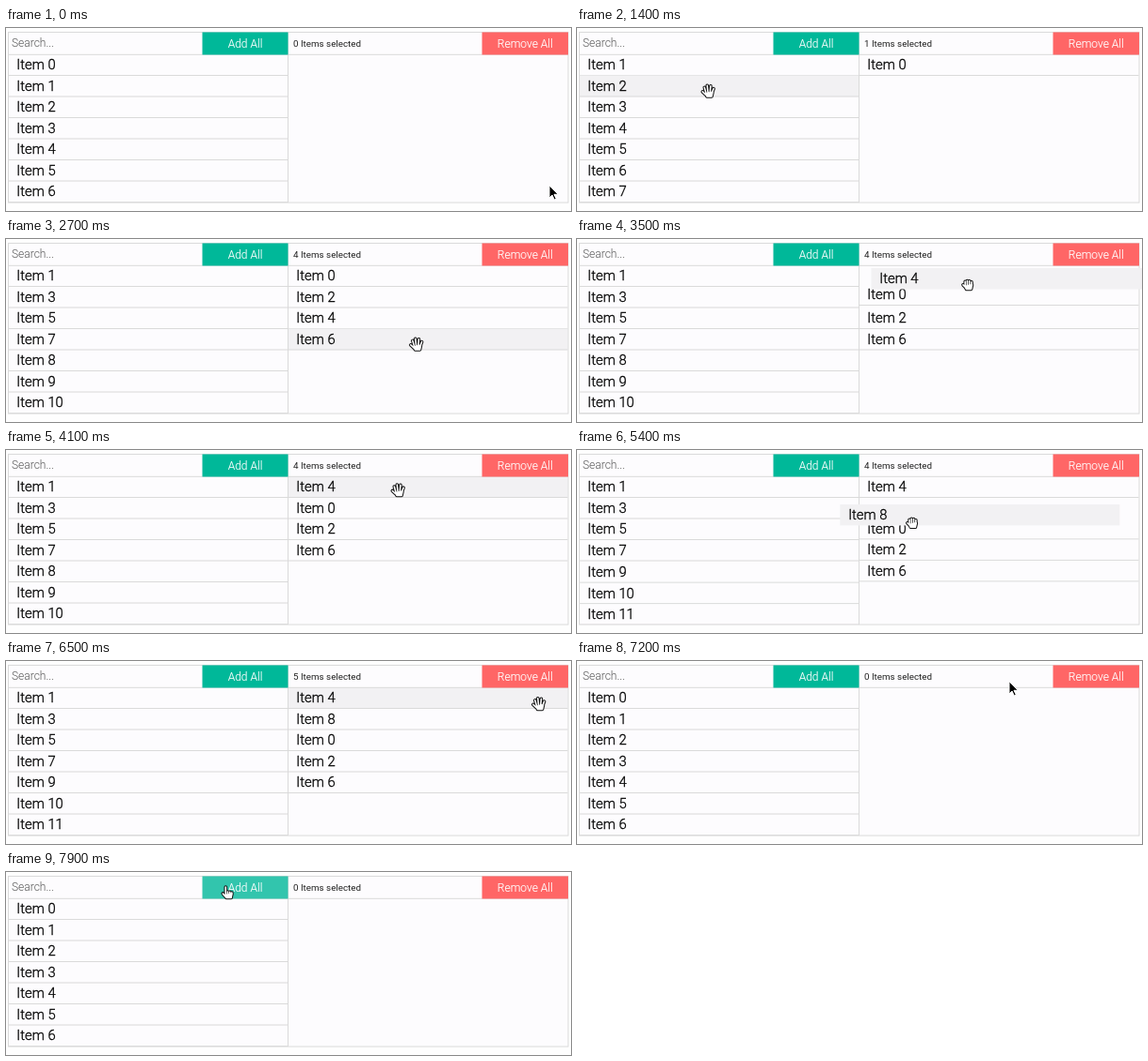
Write an HTML page that moves like this. It is 600 px wide and 195 px high and loops after 8000 ms.

```html
<!DOCTYPE html>
<html lang="en">
<head>
<meta charset="utf-8">
<title>Dual list picker</title>
<style>
html, body { margin: 0; width: 100%; height: 100%; overflow: hidden; background: #fefefe; }
svg { display: block; font: 300 12px Roboto, sans-serif; }
.row { font-size: 14.8px; stroke: #000; stroke-width: .3px; }
.count { font-size: 9.8px; font-weight: 400; fill: #222; }
.button { fill: #fff; stroke: #fff; stroke-width: .15px; text-anchor: middle; }
.cursor { stroke-linejoin: round; stroke-linecap: round; }
</style>
</head>
<body>
<svg id="stage" width="600" height="195" viewBox="0 0 600 195"></svg>
<script>
const LOOP = 8000, TOP = 28, ROW = 22.5, WIDTH = 297, LEFT = 2.5, RIGHT = 299.5;
const GREY = '#dadada', HOVER = '#f2f1f3';
const FIRST_CLICK = 1200, CLICK_GAP = 400, CLICKS = 4, CLEAR = 6800;
const stage = document.getElementById('stage');

// Dragged rows: push gives how many rows another item makes way, lag when it starts
const drags = [
  { item: 4, from: 3100, drop: 3800, x: RIGHT, slot: 2, to: 0,
    push: (n, right) => right && n < 4 ? 1 : 0, lag: n => 200 - 50 * n },
  { item: 8, from: 4900, drop: 5900, x: LEFT, slot: 4, to: 1,
    push: (n, right) => right ? +(n !== 4) : -(n > 8), lag: () => 250 }
];

// Pointer moves; it rests between them
const rowY = i => TOP + ROW * (i + .75);
const moves = [];
const go = (from, to, x, y) => moves.push({ from, to, x, y });
go(100, 650, 285, 24);
go(650, 1100, 140, rowY(0));
for (let i = 1; i < CLICKS; i++) {
  const click = FIRST_CLICK + CLICK_GAP * (i - 1);
  go(click, click + 100, 140 - i / 2, rowY(i));
}
go(2400, 2700, 436, rowY(3));
go(2700, 2900, 402, rowY(2));
go(3100, 3600, 416.5, 43);
go(4100, 4700, 79, rowY(4) + 2);
go(4900, 5500, 378, 72);
go(5900, 6500, 566, rowY(0) + 1);
go(6500, 6700, 555, 22);
go(6800, 7900, 235.5, 22);

const ARROW = 'M0 0V13L3 10L5.3 15L7.3 14L5 9.3H9Z';
const PALM = 'M-3 2.5L-1.5 5.5H3.5L4.5 1Z';
const hands = {
  open: 'M-2.5 2L-4.2-4M-.5 1L-1.2-6M1.8 1L2.4-5.6M4 1.5L5.6-2.8M-3 3.5L-6.2.5' + PALM,
  fist: 'M-2.8 1V-2.5M-.6 1V-3.4M1.7 1V-3.2M4 1V-2M-3 3L-5 1' + PALM,
  point: 'M-2.2 2V-6M0 1.5V-1M2.2 1.5V-.6M4.3 2V0M-2.8 4L-5.2 1' + PALM
};

const clamp = v => Math.max(0, Math.min(1, v));
const easeOut = v => 1 - (1 - clamp(v)) ** 2;
const smooth = v => (v = clamp(v), v * v * (3 - 2 * v));
const mix = (a, b, p) => a + (b - a) * p;

const pointerAt = t => moves.reduce(([x, y], m) => {
  const p = smooth((t - m.from) / (m.to - m.from));
  return [mix(x, m.x, p), mix(y, m.y, p)];
}, [577, 168]);

function chosenAt(t) {
  if (t >= CLEAR) return [];
  const clicks = Math.max(0, Math.floor((t - FIRST_CLICK) / CLICK_GAP) + 1);
  let list = Array.from({ length: Math.min(CLICKS, clicks) }, (_, i) => 2 * i);
  for (const d of drags) if (t >= d.drop) {
    list = list.filter(n => n !== d.item);
    list.splice(d.to, 0, d.item);
  }
  return list;
}

const rect = (x, y, w, h, fill, extra = '') =>
  `<rect x="${x}" y="${y}" width="${w}" height="${h}" fill="${fill}" ${extra}/>`;
const text = (x, y, s, extra) => `<text x="${x}" y="${y}" ${extra}>${s}</text>`;
const label = (x, y, n) => text(x + 8.8, y + 16.4, 'Item ' + n, 'class="row"');
const line = (x, y, w) => rect(x, y - .5, w, 1, GREY);
const button = (x, w, s, fill, hover) =>
  rect(x, 4.5, w, 24, fill, hover ? 'opacity=".8"' : '') +
  text(x + w / 2, 20.8, s, 'class="button"');

function drawCursor(kind, x, y) {
  const stroke = (color, width) => `fill="${color}" stroke="${color}" stroke-width="${width}"`;
  const shape = kind === 'arrow'
    ? `<path d="${ARROW}" stroke="#fff"/>`
    : `<path d="${hands[kind]}" ${stroke('#111', 3.6)}/><path d="${hands[kind]}" ${stroke('#fff', 1.6)}/>`;
  return `<g class="cursor" transform="translate(${x} ${y})">${shape}</g>`;
}

function drawDragged(d, t) {
  const [gx, gy] = pointerAt(d.from);
  const [hx, hy] = pointerAt(Math.min(t, d.drop));
  const p = easeOut((t - d.drop) / 200);
  const x = mix(d.x + hx - gx, RIGHT, p);
  const y = mix(TOP + ROW * d.slot + hy - gy, TOP + ROW * d.to, p);
  return rect(x, y, WIDTH, ROW, HOVER) + label(x, y, d.item);
}

function draw(t) {
  const [px, py] = pointerAt(t);
  const chosen = chosenAt(t);
  const rest = [...Array(14).keys()].filter(n => !chosen.includes(n));
  const drag = drags.find(d => t >= d.from && t < d.drop + 200);
  const held = drag && t < drag.drop;
  const over = (x, y, w, h) => !held && px >= x && px < x + w && py >= y && py < y + h;
  let cursor = held ? 'fist' : 'arrow';

  const list = (items, x) => items.map((n, i) => {
    if (drag && drag.item === n) return '';
    const shift = held ? drag.push(n, x === RIGHT) * easeOut((t - drag.from - drag.lag(n)) / 300) : 0;
    const y = TOP + ROW * (i + shift);
    const hover = over(x, y, WIDTH, ROW);
    if (hover) cursor = 'open';
    return (hover ? rect(x, y, WIDTH, ROW, HOVER) : '') + label(x, y, n) + line(x, y + ROW, WIDTH);
  }).join('');

  const overAdd = over(209, 5, 90, 23), overRemove = over(506, 5, 91, 23);
  const lists = list(rest, LEFT) + list(chosen, RIGHT);
  if (overAdd || overRemove) cursor = 'point';

  stage.innerHTML = rect(LEFT, 4.5, 594.5, 181.5, '#fdfcfe') +
    '<clipPath id="lists"><path d="M2 28H597.5V186H2Z"/></clipPath>' +
    `<g clip-path="url(#lists)">${lists}</g>` +
    rect(LEFT, 4.5, 594.5, 181.5, 'none', `stroke="${GREY}"`) +
    line(LEFT, 28.3, 594.5) + rect(299, 5, 1, 181, GREY) +
    text(6, 20, 'Search...', 'fill="#555"') +
    text(305, 20, chosen.length + ' Items selected', 'class="count"') +
    button(208.5, 91, 'Add All', '#00b899', overAdd) +
    button(505.5, 91.5, 'Remove All', '#ff6666', overRemove) +
    (drag ? drawDragged(drag, t) : '') +
    drawCursor(cursor, px, py);
}

const start = performance.now();
function tick() {
  const t = (performance.now() - start) % LOOP;
  draw(Math.floor(t / 100) * 100);
  requestAnimationFrame(tick);
}
tick();
</script>
</body>
</html>
```
